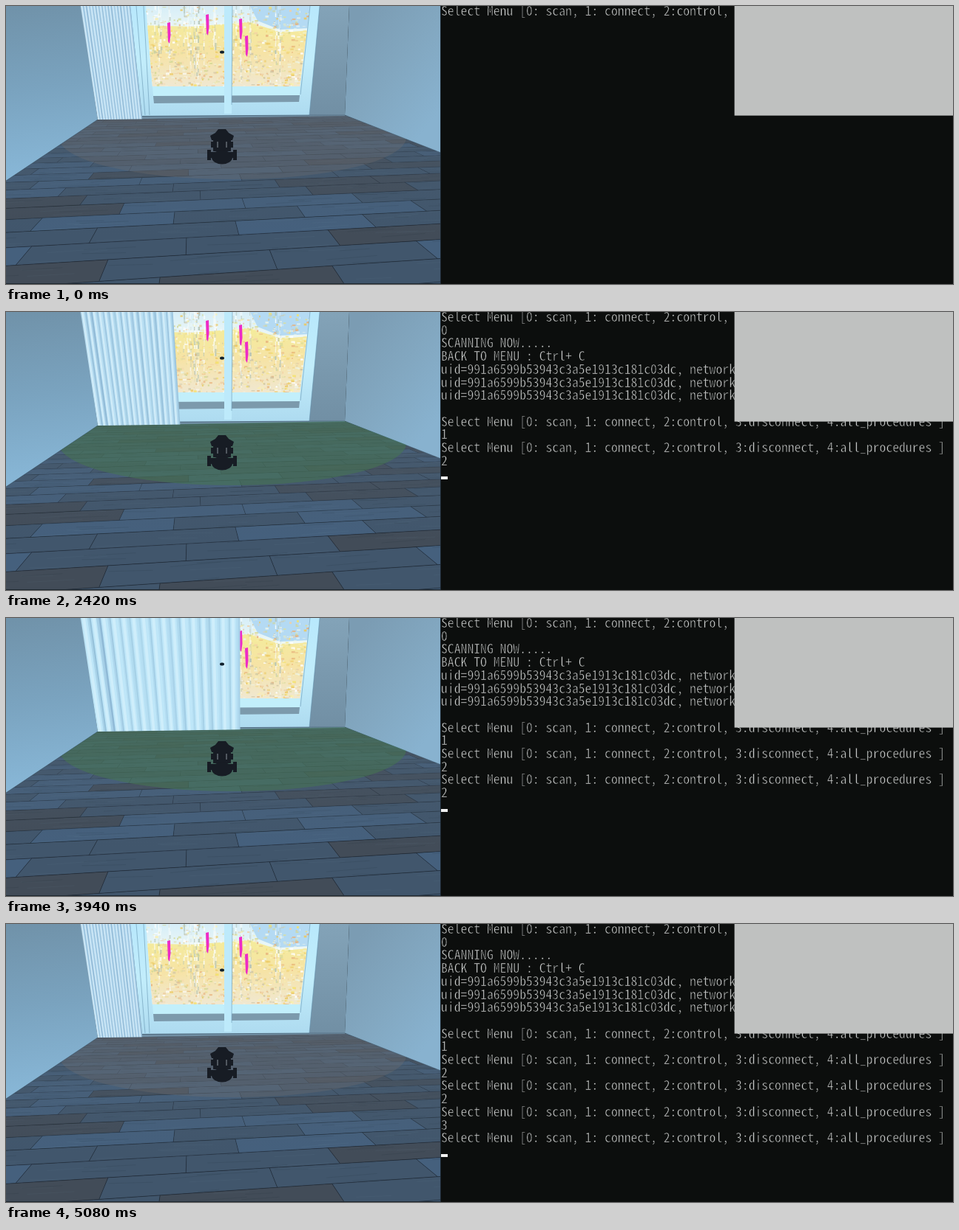
An HTML page with a canvas that plays this animation: 1280x377 px, repeating every 5.16 s.

```html
<!DOCTYPE html>
<html lang="en">
<head>
<meta charset="utf-8">
<title>Room and console</title>
<style>
  html, body { margin: 0; width: 100%; height: 100%; overflow: hidden; background: #0c0e0d; }
  canvas, svg { position: absolute; left: 0; top: 0; display: block; }
  text {
    font-family: "Noto Sans Mono CJK KR", "Noto Sans Mono CJK JP", "Liberation Mono", monospace;
    fill: #cfd1d0;
    stroke: #0c0e0d;
    stroke-width: .55px;
    white-space: pre;
  }
</style>
</head>
<body>
<canvas id="room" width="588" height="377"></canvas>
<canvas id="live" width="588" height="377"></canvas>
<svg width="1280" height="377">
  <g id="rows"></g>
  <rect id="cursor" width="9" height="4" fill="#f2f2f2"/>
  <rect x="984.6" width="296" height="148.6" fill="#bfc1c0"/>
</svg>
<script>
const LOOP = 5160;
const room = document.getElementById('room').getContext('2d');
const live = document.getElementById('live').getContext('2d');

let seed = 11;
function rand(a = 1, b = 0) {
  seed = (seed * 1664525 + 1013904223) % 4294967296;
  return b + (a - b) * seed / 4294967296;
}
const pick = list => list[Math.floor(rand(list.length))];

function trace(c, pts) {
  c.beginPath();
  for (let i = 0; i < pts.length; i += 2) c.lineTo(pts[i], pts[i + 1]);
  c.closePath();
}
function poly(c, fill, ...pts) {
  trace(c, pts);
  c.fillStyle = fill;
  c.fill();
}
function oval(c, fill, ...shape) {
  c.beginPath();
  c.ellipse(...shape, 0, 0, 7);
  c.fillStyle = fill;
  c.fill();
}
function line(color, x0, y0, x1, y1) {
  room.beginPath();
  room.moveTo(x0, y0);
  room.lineTo(x1, y1);
  room.strokeStyle = color;
  room.stroke();
}
function clipped(c, pts, draw) {
  c.save();
  trace(c, pts);
  c.clip();
  draw();
  c.restore();
}
function blend(x0, y0, x1, y1, ...colors) {
  const g = room.createLinearGradient(x0, y0, x1, y1);
  colors.forEach((col, i) => g.addColorStop(i / (colors.length - 1), col));
  return g;
}

// ---- floor: planks in perspective towards (VX, VY)
const VX = 252, VY = 68, PLANK = .81;
const FLOOR = [0, 237, 124, 154, 458, 148, 588, 198, 588, 377, 0, 377];
const STAGGER = [.82, .49, .96, .32, .86, .43, .07];
const TONES = ['#45607d', '#41566c', '#41566c', '#424c58'];

function floorPoint(u, k) {
  const depth = 1 / (.003367 + .00035 * k);
  const slope = -.018 - .000229 * (VY + depth - 150);
  const d = depth / (1 - slope * u * PLANK);
  return [VX + u * PLANK * d, VY + d];
}

function drawPlank(u, k) {
  const quad = [...floorPoint(u, k), ...floorPoint(u + 1, k),
                ...floorPoint(u + 1, k + 1), ...floorPoint(u, k + 1)];
  poly(room, pick(TONES), ...quad);
  for (let i = 0; i < 5; i++) {
    const v = k + rand(), a = u + rand(.6), b = a + rand(.4, .1);
    const grain = rand() < .5 ? 'rgba(30,40,52,.16)' : 'rgba(130,160,190,.08)';
    line(grain, ...floorPoint(a, v), ...floorPoint(b, v + rand(.1, -.1)));
  }
  trace(room, quad);
  room.strokeStyle = `rgba(24,32,42,${Math.max(.1, .45 - k * .03)})`;
  room.stroke();
}

const disc = (c, fill) => clipped(c, FLOOR, () => oval(c, fill, 306, 178, 235, 57));

function drawFloor() {
  room.lineWidth = .8;
  clipped(room, FLOOR, () => {
    for (let k = 27; k >= -2; k--)
      for (let i = -4; i < 5; i++) drawPlank(i + STAGGER[(k + 8) % 7], k);
    room.fillStyle = blend(0, 150, 0, 310, 'rgba(76,94,112,.6)', 'rgba(76,94,112,0)');
    room.fillRect(0, 140, 588, 237);
  });
  disc(room, 'rgba(112,110,108,.32)');
}

// ---- walls, window and the view outside
function drawWalls() {
  poly(room, blend(0, 0, 30, 230, '#7092a9', '#7aa3bf', '#88b7d7'), 0, 0, 102, 0, 124, 154, 0, 237);
  poly(room, blend(0, 0, 0, 150, '#83a3b8', '#718fa4'), 100, 0, 464, 0, 458, 149, 124, 154);
  poly(room, blend(460, 40, 588, 140, '#7b9cb3', '#82a7c0', '#88b2cf'), 464, 0, 588, 0, 588, 199, 458, 148);
  const edge = 'rgba(60,85,105,.5)';
  line(edge, 0, 237, 124, 154);
  line(edge, 410, 148, 458, 148);
  line(edge, 458, 148, 588, 199);
}

function drawView() {
  room.fillStyle = blend(0, 0, 0, 50, '#d6eef8', '#f8fcf4');
  room.fillRect(180, 0, 240, 112);
  poly(room, '#b4daf3', 330, 0, 412, 0, 412, 30, 370, 32, 340, 20);
  poly(room, blend(0, 20, 0, 110, '#f4ec9a', '#f6e3a6', '#f0e8d2'),
    180, 26, 250, 28, 330, 22, 372, 36, 412, 33, 412, 112, 180, 112);
  const leaves = ['#f5e26a', '#ecc860', '#e8b27c', '#d4d894', '#ffffff', '#eef6ea', '#fbf0b0', '#cfc6a6', '#f2cfa4'];
  for (let i = 0; i < 1000; i++) {
    room.fillStyle = pick(leaves);
    room.globalAlpha = rand(.9, .35);
    room.fillRect(rand(410, 186), 112 * rand() ** .8, rand(5, 1), rand(3, 1));
  }
  for (let i = 0; i < 26; i++) {
    const x = rand(385, 194), foot = rand(108, 50);
    for (let y = 0; y < foot; y += 5) {
      room.globalAlpha = rand(.9);
      room.fillStyle = pick(['#fbfefc', '#fbfefc', '#b4c4b8']);
      room.fillRect(x + rand(1.5), y, rand(2.4, 1), 5);
    }
  }
  room.globalAlpha = 1;
  for (const [x, y] of [[218, 22], [270, 11], [315, 17], [323, 40]])
    poly(room, '#ee2cc6', x, y + 1, x + 4, y, x + 4.5, y + 18, x + 3, y + 29, x + 1, y + 26);
}

function drawWindow() {
  poly(room, blend(0, 0, 0, 148, '#b8e8fc', '#c2edfb', '#aedbf0'), 168, 0, 424, 0, 410, 148, 184, 149);
  clipped(room, [189, 0, 411, 0, 397, 110, 198, 110], drawView);
  poly(room, '#c2effb', 198, 109, 397, 109, 397, 122, 199, 122);
  poly(room, '#7c9aac', 199, 122, 397, 121, 396, 130, 200, 132);
  poly(room, '#bdeafb', 295, 0, 306, 0, 305, 146, 295, 146);
  const seam = 'rgba(88,135,165,.5)';
  line(seam, 176, 0, 188, 148);
  line(seam, 186, 0, 194, 148);
  line(seam, 424, 0, 410, 148);
  line(seam, 411, 0, 398, 120);
  line(seam, 306, 0, 305, 134);
  line('rgba(50,75,95,.6)', 184, 149.5, 410, 148);
}

// ---- moving parts
const OPEN = 184, TRAVEL = 252, PLEATS = 16;
const progress = (t, from, to) => Math.min(1, Math.max(0, (t - from) / (to - from)));
const closed = t => progress(t, 2110, 3350) ** 1.15 - progress(t, 3500, 4430);

const topX = x => 101 + 1.1186 * (x - 124);
const hemY = x => 154 - (x - 124) * .0145;
const strip = (a, b, fill) =>
  poly(live, fill, topX(a), 0, topX(b), 0, b, hemY(b), a, hemY(a));

function drawCurtain(s) {
  const edge = OPEN + TRAVEL * s, step = (edge - 124) / PLEATS;
  const mix = (a, b) => Math.round(a + (b - a) * s);
  strip(124, edge, `rgb(${mix(182, 197)},${mix(218, 241)},${mix(240, 255)})`);
  for (let i = 0; i < PLEATS; i++) {
    const x = 124 + i * step;
    const shade = (i < 3 ? .45 : .42 - .36 * s) * (.8 + .2 * Math.sin(i * 2.3));
    const w = step * (.34 + .1 * Math.sin(i * 1.7));
    strip(x + step - w, x + step, `rgba(76,124,164,${shade * .5})`);
    strip(x + step - w * .45, x + step, `rgba(76,124,164,${shade * .6})`);
    strip(x + step * .15, x + step * .45, `rgba(240,252,255,${.5 - .3 * s})`);
  }
}

function drawRobot() {
  const mirrored = (fill, dx, y, w, h) => {
    live.fillStyle = fill;
    live.fillRect(292 - dx - w, y, w, h);
    live.fillRect(292 + dx, y, w, h);
  };
  const dark = '#171c24';
  poly(live, dark, 287, 167, 297, 167, 301, 172, 308, 176, 306, 182, 278, 182, 276, 176, 283, 172);
  mirrored(dark, 0, 181, 12, 16);
  mirrored(dark, 9, 184, 6, 8);
  mirrored(dark, 15, 195, 5, 14);
  mirrored(dark, 0, 198, 15, 8);
  oval(live, dark, 292, 205, 14, 9.5);
  mirrored('#8b939c', 5.5, 184, 1, 8);
}

// ---- console stream: [time, printed text]
const MENU = 'Select Menu [0: scan, 1: connect, 2:control, 3:disconnect, 4:all_procedures ]\n';
const UID = 'uid=991a6599b53943c3a5e1913c181c03dc, network\n';
const STREAM = [
  [0, MENU], [330, '0'], [630, '\nSCANNING NOW.....\nBACK TO MENU : Ctrl+ C\n'],
  [760, UID], [900, UID], [1040, UID], [1250, '\n' + MENU],
  [1600, '1'], [1900, '\n' + MENU], [2100, '2'], [2200, '\n'], [3100, MENU],
  [3450, '2'], [3560, '\n'], [4020, MENU], [4550, '3'], [4700, '\n'], [4800, MENU]
];
const CELL = 8.85, LINE = 17.7, LEFT = 588;
const rows = document.getElementById('rows');
const cursor = document.getElementById('cursor');
const lines = Array.from({ length: 18 }, (_, i) => {
  const el = document.createElementNS('http://www.w3.org/2000/svg', 'text');
  el.setAttribute('x', LEFT);
  el.setAttribute('y', 13 + i * LINE);
  rows.append(el);
  return el;
});

// pick the font size whose advance is one console cell
room.font = '100px ' + getComputedStyle(lines[0]).fontFamily;
rows.style.fontSize = CELL * 100 / room.measureText('0').width + 'px';

let shown = '';
function drawConsole(t) {
  const out = STREAM.filter(e => e[0] <= t).map(e => e[1]).join('');
  cursor.style.visibility = t < 90 ? 'hidden' : 'visible';
  if (out === shown) return;
  shown = out;
  const text = out.split('\n'), last = text.length - 1;
  lines.forEach((el, i) => { el.textContent = text[i] || ''; });
  cursor.setAttribute('x', LEFT + Math.round(text[last].length * CELL));
  cursor.setAttribute('y', Math.round(last * LINE + 10.8));
}

function render(t) {
  live.clearRect(0, 0, 588, 377);
  if (t >= 1900 && t < 5010) disc(live, 'rgba(44,124,66,.34)');
  drawCurtain(closed(t));
  oval(live, '#10202c', 292, 62.5, 3, 2);
  drawRobot();
  drawConsole(t);
}

drawFloor();
room.lineWidth = 1;
drawWalls();
drawWindow();
room.fillStyle = '#1d2730';
room.fillRect(0, 376, 588, 1);
room.fillRect(587, 0, 1, 377);

const start = performance.now();
function tick() {
  render((performance.now() - start) % LOOP);
  requestAnimationFrame(tick);
}
tick();
</script>
</body>
</html>
```
